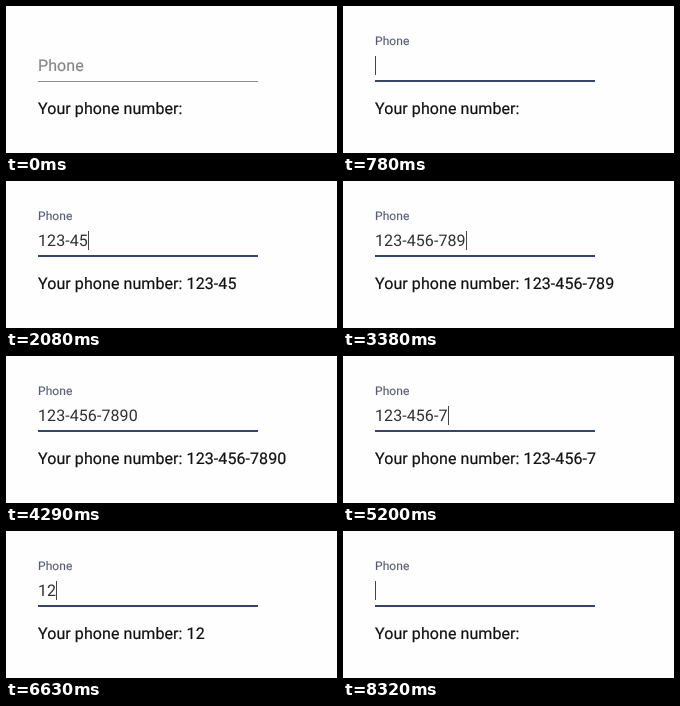
Recreate the animation shown at these times as an HTML page. Size 331 by 147 pixels, loop 8.45 s.

```html
<!DOCTYPE html>
<html lang="en">
<head>
<meta charset="utf-8">
<title>Phone field</title>
<style>
  html, body {
    margin: 0;
    width: 100%;
    height: 100%;
    overflow: hidden;
    background: #fefefe;
  }
  body {
    position: relative;
    font: 16px/19px Roboto, Arial, sans-serif;
    letter-spacing: .08px;
    text-rendering: geometricPrecision;
  }
  div { position: absolute; white-space: pre; }

  .label {
    left: 32px;
    top: 50px;
    color: #868686;
    -webkit-text-stroke: .2px;
    transform-origin: 0 0;
    animation: float 8450ms linear infinite;
  }
  .field { left: 32px; top: 50px; color: #303030; }
  .caret { top: 50px; width: 1px; height: 19px; background: #444; }
  .line { left: 32px; top: 75px; width: 220px; height: 1px; background: #8e8e8e; }
  .ripple {
    left: 32px;
    top: 74px;
    width: 220px;
    height: 2px;
    background: #37426f;
    animation: spread 8450ms linear infinite;
  }
  .output { left: 32px; top: 93px; color: #111; -webkit-text-stroke: .2px; }

  /* focus at 390 ms; label takes 400 ms, underline 300 ms */
  @keyframes float {
    0%, 4.615% {
      transform: none;
      color: #868686;
      animation-timing-function: cubic-bezier(.25, .8, .25, 1);
    }
    9.349%, 100% {
      transform: translateY(-22.25px) scale(.75);
      color: #585c74;
    }
  }
  @keyframes spread {
    0%, 4.615% {
      transform: scaleX(.5);
      opacity: 0;
      animation-timing-function: cubic-bezier(.25, .8, .25, 1);
    }
    8.166%, 100% { transform: none; opacity: 1; }
  }
</style>
</head>
<body>
<div class="label">Phone</div>
<div class="field" id="field"></div>
<div class="line"></div>
<div class="ripple"></div>
<div class="caret" id="caret" hidden></div>
<div class="output">Your phone number: <span id="echo"></span></div>

<script>
  const LOOP = 8450;
  const FOCUS = 390;
  const DIGITS = '1234567890';
  // Times of each key press: first the digits, then the backspaces.
  const typed = [1040, 1300, 1430, 1690, 2080, 2340, 2600, 2990, 3380, 3770];
  const erased = [4810, 4940, 5200, 5330, 5460, 5720, 6240, 6630, 6760, 6890];
  const caretOff = [[4290, 4810], [7280, 7800]];

  const [field, caret, echo] = ['field', 'caret', 'echo'].map(id => document.getElementById(id));

  const countUntil = (times, t) => times.filter(x => x <= t).length;

  const mask = s => [s.slice(0, 3), s.slice(3, 6), s.slice(6)].filter(Boolean).join('-');

  function draw(t) {
    const count = countUntil(typed, t) - countUntil(erased, t);
    const text = mask(DIGITS.slice(0, count));
    if (field.textContent !== text) field.textContent = echo.textContent = text;
    caret.hidden = t < FOCUS || caretOff.some(([from, to]) => t >= from && t < to);
    caret.style.left = Math.round(32 + field.getBoundingClientRect().width) + 'px';
  }

  let start;
  function tick(now) {
    start ??= now;
    draw((now - start) % LOOP);
    requestAnimationFrame(tick);
  }
  requestAnimationFrame(tick);
</script>
</body>
</html>
```
